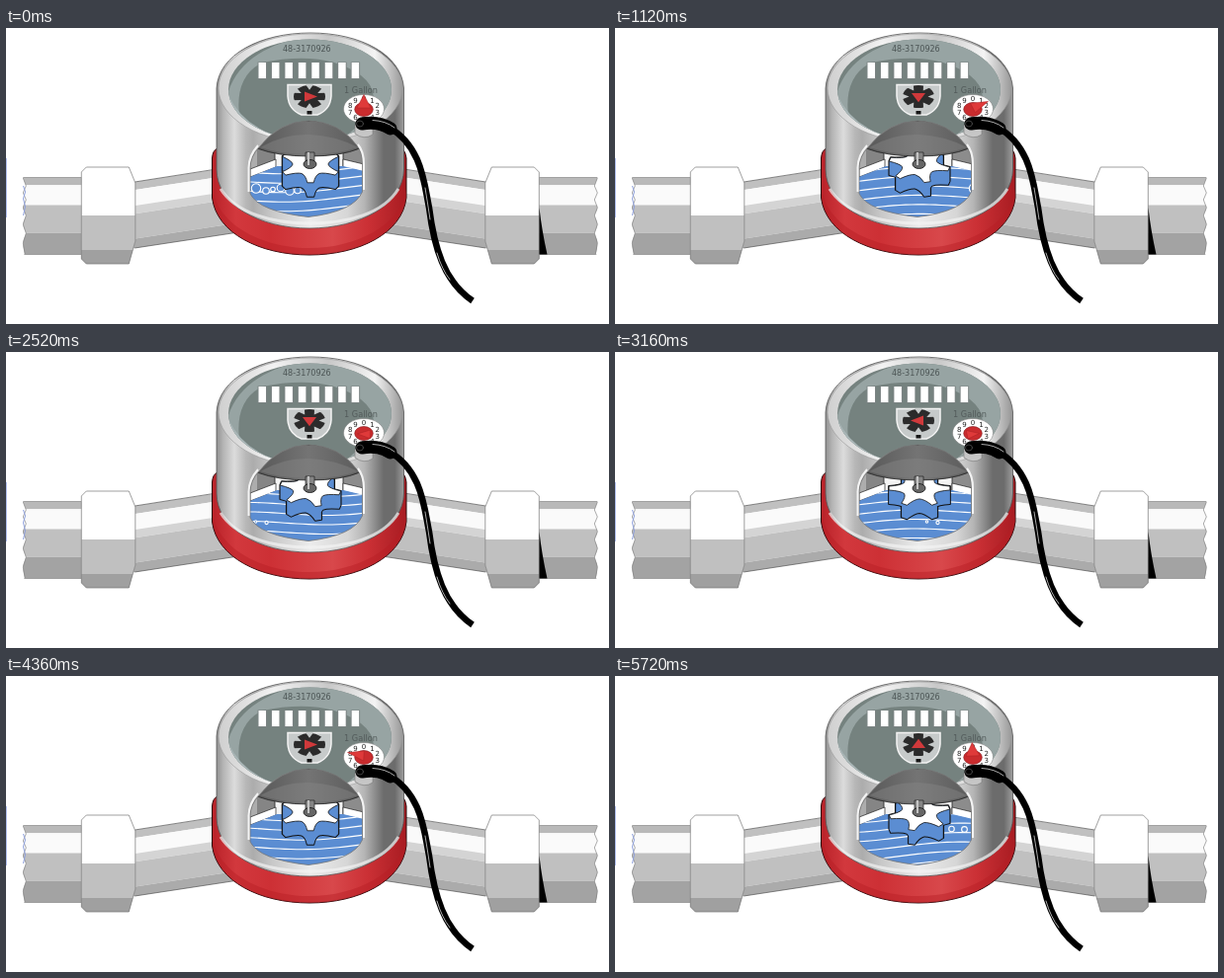
These frames come from a looping animation (610x300 px, 5760 ms). An HTML page:

```html
<!DOCTYPE html>
<html lang="en">
<head>
<meta charset="utf-8">
<title>Water meter</title>
<style>
html, body { margin: 0; width: 100%; height: 100%; overflow: hidden; background: #fff; }
svg { display: block; width: 610px; height: 300px; }
text { font-family: "DejaVu Sans", sans-serif; }
</style>
</head>
<body>
<svg viewBox="0 0 610 300" xmlns="http://www.w3.org/2000/svg">
  <defs>
    <linearGradient id="steel" gradientUnits="userSpaceOnUse" x1="212" x2="403" y1="0" y2="0">
      <stop offset="0" stop-color="#8c8c8c"/><stop offset=".04" stop-color="#b4b4b4"/>
      <stop offset=".1" stop-color="#dcdcdc"/><stop offset=".16" stop-color="#b8b8b8"/>
      <stop offset=".2" stop-color="#acacac"/><stop offset=".3" stop-color="#c8c8c8"/>
      <stop offset=".5" stop-color="#ececec"/><stop offset=".7" stop-color="#d6d6d6"/>
      <stop offset=".79" stop-color="#b4b4b4"/><stop offset=".84" stop-color="#909090"/>
      <stop offset=".89" stop-color="#6c6c6c"/><stop offset=".95" stop-color="#6c6c6c"/>
      <stop offset="1" stop-color="#a0a0a0"/>
    </linearGradient>
    <linearGradient id="rim" x1="0" x2="1" y1="0" y2="0">
      <stop offset="0" stop-color="#cfcfcf"/><stop offset=".3" stop-color="#f2f2f2"/>
      <stop offset=".6" stop-color="#c8c8c8"/><stop offset=".85" stop-color="#f4f4f4"/>
      <stop offset="1" stop-color="#999"/>
    </linearGradient>
    <linearGradient id="red" gradientUnits="userSpaceOnUse" x1="209" x2="405" y1="0" y2="0">
      <stop offset="0" stop-color="#b92229"/><stop offset=".12" stop-color="#d2383d"/>
      <stop offset=".3" stop-color="#cd3035"/><stop offset=".62" stop-color="#d8484b"/>
      <stop offset=".8" stop-color="#cb3035"/><stop offset="1" stop-color="#a81c22"/>
    </linearGradient>
    <linearGradient id="dome" x1="0" x2="1" y1="0" y2="0">
      <stop offset="0" stop-color="#585858"/><stop offset=".5" stop-color="#747474"/><stop offset="1" stop-color="#5c5c5c"/>
    </linearGradient>
    <clipPath id="window">
      <path id="opening" d="M247 168V143Q247 130 256 121Q276 95 306 94Q337 95 355 119Q360.500 126 360.500 138V166Q352 186 306 191.500Q256 186 247 168Z"/>
    </clipPath>
    <clipPath id="water"><path d="M247 151L274 140H341L362 145V195H247Z"/></clipPath>
    <clipPath id="face"><ellipse cx="307.500" cy="62.500" rx="82.500" ry="51"/></clipPath>
  </defs>

  <path d="M.5 132V192" stroke="#b5c3f2"/>
  <g id="leftPipe" stroke-width=".7" transform="translate(-.7)"></g>
  <g id="rightPipe" stroke-width=".7" transform="matrix(-1 0 0 1 616.3 0)"></g>
  <path d="M17.500 160l2 6-2 7 2 8-2 9" fill="none" stroke="#8ea0dc"/>
  <path d="M539.500 182Q542 205 547.500 229.500H539.500Z"/>

  <path d="M214 122Q209 124 208.500 132V172C213 208 257 230 307 230S401 208 405 172V132Q404 124 400 122Z" fill="url(#red)" stroke="#2b0c0e"/>
  <path d="M209 163C214 200 260 223 307 223S400 200 405 163V172C401 208 357 230 307 230S213 208 209 172Z" fill="#b51d24" opacity=".45"/>
  <path d="M213 61C215 27 257 5 308 5S400 27 402.500 61V143C402 179 358 203 307 203S213 179 213 143Z" fill="url(#steel)" stroke="#555" stroke-width=".8"/>
  <path d="M217 163C232 187 268 198 307 198S382 188 397 163" fill="none" stroke="#f4f4f4" stroke-width="3" opacity=".7"/>
  <ellipse cx="308" cy="61" rx="93" ry="55" fill="url(#rim)" stroke="#999" stroke-width=".6"/>
  <ellipse cx="307.500" cy="62.500" rx="82.500" ry="51" fill="#75827f"/>
  <g clip-path="url(#face)">
    <path d="M223 72Q233 23 304 8L355 13Q394 30 393 60Q387 103 342 111Q391 73 359 48Q323 22 259 35Q229 50 237 96Z" fill="#97a4a3"/>
    <path d="M224 66Q237 96 270 108L250 116L222 96Z" fill="#aab7b8"/>
  </g>
  <text x="280" y="24" font-size="8" fill="#4c5555">48-3170926</text>
  <g id="counter"></g>

  <path d="M285 57.500H329V69Q328 83 315 88H299Q286 83 285 69Z" fill="#c6caca" stroke="#f3f3f3" stroke-width="1.500"/>
  <rect x="304.500" y="84" width="5" height="3.500" fill="#161616"/>
  <g transform="translate(307 69.500) scale(1 .72)"><g id="flowStar"></g></g>

  <text x="342" y="66" font-size="8.200" fill="#535b5b">1 Gallon</text>
  <ellipse cx="362" cy="82" rx="20.500" ry="14.500" fill="#fff" stroke="#777" stroke-width=".5"/>
  <g id="digits" font-size="7" text-anchor="middle" fill="#222"></g>
  <ellipse cx="362" cy="82.500" rx="9.300" ry="7" fill="#c92c2e" stroke="#7d1418" stroke-width=".6"/>
  <path id="needle" fill="#df3a3a" stroke="#a82023" stroke-width=".5"/>

  <use href="#opening" fill="#c8c8c8"/>
  <g clip-path="url(#window)">
    <path d="M247 119H272V138L247 148Z" fill="#858585"/>
    <path d="M247 119H254V146L247 149Z" fill="#adadad"/>
    <path d="M341 119H362V142L341 136Z" fill="#8c8c8c"/>
    <path d="M272 119H341V142H272Z" fill="#f4f4f4" stroke="#222" stroke-width=".8"/>
    <path d="M247 143L273 133V141L247 151ZM341 133L362 138V146L341 141Z" fill="#fff" stroke="#222" stroke-width=".7"/>
    <g clip-path="url(#water)">
      <rect x="246" y="135" width="118" height="60" fill="#5b8dd2"/>
      <path id="ripples" fill="none" stroke="#fff" stroke-width="1.100"/>
      <g id="bubbles" fill="#5b8dd2" stroke="#fff" stroke-width="1.100"></g>
    </g>
    <g stroke-linejoin="round">
      <path id="wheelEdge" stroke="#111" stroke-width="2"/>
      <path id="wheelSide" fill="#5b8dd2"/>
      <path id="wheelTop" fill="#fff" stroke="#111" stroke-width=".8"/>
    </g>
    <path d="M254 122Q274 94 306 94T358 122Q339 130 307 130T254 122Z" fill="url(#dome)" stroke="#222" stroke-width=".8"/>
    <path d="M257 121Q281 107 307 108T356 121Q337 128 307 128T257 121Z" fill="#858585" opacity=".45"/>
    <path d="M303 126H312V138H303Z" fill="#858585" stroke="#222" stroke-width=".7"/>
    <ellipse cx="307.500" cy="138" rx="6.500" ry="4.500" fill="#666" stroke="#111" stroke-width=".8"/>
    <path d="M306 126V139" stroke="#c4c4c4" stroke-width="2"/>
  </g>
  <use href="#opening" fill="none" stroke="#777" stroke-width=".8"/>
  <path d="M245.500 166V143Q245 130 255 119M362 164V138Q362 125 356 118" fill="none" stroke="#f4f4f4" stroke-width="2"/>

  <path d="M353 98V107Q362 114 371 108V98Z" fill="#c6c6c6" stroke="#777" stroke-width=".6"/>
  <g fill="none" stroke="#000" stroke-linecap="round">
    <path d="M360 97Q377 94 389 102" stroke-width="13"/>
    <path d="M386 100C421 119 423 158 428 182C433 222 443 257 472 276.500" stroke-width="6.500" stroke-linecap="butt"/>
    <path d="M371 93.500Q384 94 393 101M424 162Q427 180 429 194M436 228Q441 245 449 255" stroke="#aaa" stroke-width="1"/>
    <ellipse cx="358" cy="97" rx="3.500" ry="3" stroke="#555" stroke-width=".7"/>
  </g>
</svg>
<script>
const $ = id => document.getElementById(id);
const FRAME_MS = 40, FRAMES = 144, DRIFT = 3.93;

// Shaded strips between two upright edges given as [x, top, bottom].
function strips([xa, ta, ba], [xb, tb, bb], shades) {
  return shades.map(([from, color], i) => {
    const to = i + 1 < shades.length ? shades[i + 1][0] : 1;
    const ya = f => ta + (ba - ta) * f, yb = f => tb + (bb - tb) * f;
    return `<path fill="${color}" d="M${xa} ${ya(from)}L${xb} ${yb(from)}V${yb(to)}L${xa} ${ya(to)}Z"/>`;
  }).join("");
}

function pipe() {
  const shades = [[0, "#c0c0c0"], [.12, "#fafafa"], [.36, "#d4d4d4"], [.48, "#c0c0c0"], [.86, "#ababab"]];
  const stub = [[0, "#b9b9b9"], [.1, "#fafafa"], [.36, "#c0c0c0"], [.72, "#a3a3a3"]];
  const nut = "M82 141H125L131.500 157V216L125 239H82L77 234V146Z";
  return strips([125, 157, 224], [236, 140, 207], shades) +
    '<path d="M131 156L236 139.500M131 223L236 207" stroke="#555" fill="none"/>' +
    strips([18, 151.5, 229.5], [78, 151.5, 229.5], stub) +
    '<path d="M17 150L21 160 17 167 21 174 17 182 21 190 17 199 21 208 17 218 20 231H16V150Z" fill="#fff"/>' +
    '<path d="M18 151.500H77M19 229.500H77M18 152L21 160 18 167 21 174 18 182 21 190 18 199 21 208 18 218 20 229" fill="none" stroke="#888"/>' +
    `<path d="${nut}" fill="#fff"/>` +
    '<path d="M77 190H131.500V216L125 239H82L77 234Z" fill="#c0c0c0"/>' +
    '<path d="M77 225H129L125 239H82L77 234Z" fill="#a0a0a0"/>' +
    `<path d="${nut}" fill="none" stroke="#777"/>`;
}
$("leftPipe").innerHTML = $("rightPipe").innerHTML = pipe();

$("counter").innerHTML = Array.from({ length: 8 }, (_, i) => {
  const x = 254.5 + i * 13.45;
  return `<path d="M${x} 34.500h9.500v17.500h-9.500z" fill="#7b8383"/><path d="M${x + 1} 35h7.500v16h-7.500z" fill="#fff"/>`;
}).join("");

$("digits").innerHTML = Array.from({ length: 10 }, (_, d) => {
  const a = d * Math.PI / 5;
  return `<text x="${362 + 14.5 * Math.sin(a)}" y="${84.5 - 10.5 * Math.cos(a)}">${d}</text>`;
}).join("");

$("flowStar").innerHTML = '<circle r="16" fill="#2b2b2b"/>' +
  Array.from({ length: 6 }, (_, i) =>
    `<path d="M17-4L9.500 0L17 4Z" fill="#c6caca" transform="rotate(${i * 60 + 30})"/>`).join("") +
  '<path d="M8 0L-5 7V-7Z" fill="#d0393b"/>';

// Drifting bubbles: [offset, y, radius, frame of that radius, growth per frame].
const bubbles = [
  [253, 162.5, 4.7], [263, 165, 3.3], [270, 163.5, 2.3], [278, 162, 3.8], [287, 165, 4.3], [295, 164.5, 3.2],
  [187, 151, 4.3], [5, 172, 1.2], [16, 173, 1.6], [-109, 146, 1.8],
  [-234, 155, 5.5, 122, -.14], [-221.5, 155, 5.7, 122, -.14], [-208.5, 155.5, 5.8, 122, -.14]
];
$("bubbles").innerHTML = bubbles.map(([, y]) => `<circle cy="${y}"/>`).join("");
const circles = [...$("bubbles").children];

function ripplePath(shift) {
  let d = "";
  for (let base = 144; base < 200; base += 9.5) {
    for (let x = 246; x <= 364; x += 6) {
      const y = base - 3.2 * Math.sin((x - shift + 68) / 205 * 2 * Math.PI) - .03 * (x - 305);
      d += `${x === 246 ? "M" : "L"}${x} ${y.toFixed(2)}`;
    }
  }
  return d;
}

// Six teeth on a foreshortened wheel; turn counts tooth pitches.
function wheelPath(turn, cy) {
  const teeth = 6, pitch = 2 * Math.PI / teeth;
  const at = (k, r) => {
    const a = Math.PI / 2 + (k - turn) * pitch;
    return `${(308 + 32 * r * Math.cos(a)).toFixed(2)} ${(cy + 19.5 * r * Math.sin(a)).toFixed(2)}`;
  };
  let d = "M" + at(-.5, .56);
  for (let k = 0; k < teeth; k++)
    d += `Q${at(k - .24, .6)} ${at(k - .1, .97)}L${at(k + .1, .97)}Q${at(k + .24, .6)} ${at(k + .5, .56)}`;
  return d + "Z";
}

function draw(n) {
  const shift = n * DRIFT;
  const pose = Math.floor(n / 3) % 4;
  $("ripples").setAttribute("d", ripplePath(shift));
  bubbles.forEach(([u, , r, when = 0, growth = 0], i) => {
    circles[i].setAttribute("cx", u + shift);
    circles[i].setAttribute("r", Math.max(0, Math.min(r + 1, r + (n - when) * growth)));
  });
  const side = Array.from({ length: 15 }, (_, depth) => wheelPath(pose / 4, 138 + depth)).join("");
  $("wheelEdge").setAttribute("d", side);
  $("wheelSide").setAttribute("d", side);
  $("wheelTop").setAttribute("d", wheelPath(pose / 4, 138));
  $("flowStar").setAttribute("transform", `rotate(${pose * 90})`);

  const a = n / FRAMES * 2 * Math.PI, s = Math.sin(a), c = Math.cos(a);
  const tipX = 362 + 16.5 * s, tipY = 78 - 10.5 * c;
  $("needle").setAttribute("d",
    `M${362 - 7 * c} ${81 - 5 * s}L${tipX} ${tipY}L${362 + 7 * c} ${81 + 5 * s}Z`);
}

const start = performance.now();
function tick() {
  draw(Math.floor((performance.now() - start) / FRAME_MS) % FRAMES);
  requestAnimationFrame(tick);
}
tick();
</script>
</body>
</html>
```
